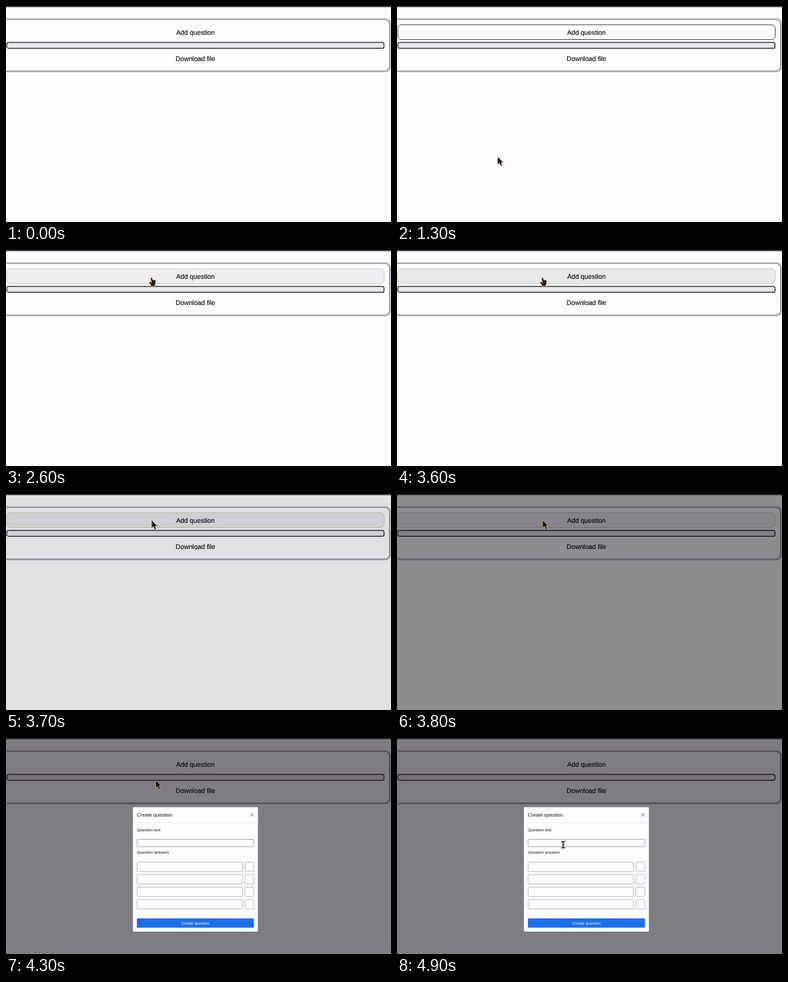
An HTML page for the animation above (5000 ms loop, 600 px wide and 338 px high).

```html
<!DOCTYPE html>
<html lang="en">
<head>
<meta charset="utf-8">
<title>Create question dialog</title>
<style>
  html, body { margin: 0; width: 100%; height: 100%; overflow: hidden; background: #fdfcff; }
  svg { display: block; width: 100vw; height: 100vh; }
  text { font-family: "Liberation Sans", Arial, sans-serif; fill: #151416; text-rendering: geometricPrecision; }
  .page { font-size: 10.3px; text-anchor: middle; stroke: #151416; stroke-width: .18; }
  .label { font-size: 6.24px; }
  .field { fill: none; stroke: #aaa8ad; stroke-width: .8; }
</style>
</head>
<body>
<svg viewBox="0 0 600 338">
  <defs>
    <filter id="soft" x="-5%" y="-20%" width="110%" height="140%"><feGaussianBlur stdDeviation="1.1"/></filter>
  </defs>

  <rect width="600" height="338" fill="#fdfcff"/>
  <rect width="600" height="1.7" fill="#34313c"/>
  <rect x="-12" y="21" width="610" height="81" rx="7" fill="none" stroke="#605e63" stroke-width="2.2" opacity=".7" filter="url(#soft)"/>
  <rect x="-12" y="21" width="609.7" height="80.7" rx="7" fill="#fdfcff" stroke="#7d7b80" stroke-width="1.1"/>
  <rect id="hover" x="1" y="29.3" width="588.5" height="23.2" rx="6"/>
  <rect id="outline" x="1" y="29.3" width="588.5" height="23.2" rx="6" fill="none"/>
  <rect x="1.3" y="57" width="587.8" height="9.2" rx="2.8" fill="#ebe8ee" stroke="#38363b" stroke-width="1.4"/>
  <text class="page" x="295.2" y="44.5">Add question</text>
  <text class="page" x="295.2" y="85.7">Download file</text>

  <rect id="backdrop" width="600" height="338" fill="#040006"/>

  <g id="modal">
    <rect x="197.8" y="108.2" width="194.8" height="194.8" rx="1.5" fill="#fdfcff"/>
    <text x="204" y="122.8" font-size="7.8">Create question</text>
    <path d="M380.3 117.2l5.8 5.8m0-5.8l-5.8 5.8" stroke="#6b696e" stroke-width=".9"/>
    <path d="M198 132.5H392.5" stroke="#e6e4e9" stroke-width=".7"/>
    <text class="label" x="204" y="145.7">Question text</text>
    <rect class="field" x="204.3" y="158.6" width="181.8" height="11.4" rx=".8" style="stroke:#8e8c91"/>
    <text class="label" x="204" y="181">Question answers</text>
    <g id="answers"></g>
    <rect x="204" y="282.2" width="182.4" height="14.5" rx="1.3" fill="#196ff2"/>
    <text class="label" x="295.2" y="291.8" text-anchor="middle" style="fill:#fff">Create question</text>
  </g>

  <g id="cursor">
    <path id="arrow" d="M0 0V12L2.8 9.7 4.8 14.4 7 13.4 5 9H8.6Z" fill="#17110e" stroke="#d9b987" stroke-width=".6"/>
    <path id="hand" d="M-1.5 3.4C-1.6 2.1 .2 1.9 .7 3L1.8 6 3.6 5.7 5.2 6.2 6.4 7 5.9 11.6 4.6 15.6H-.6L-3.7 10.4C-4.4 9 -3 8.2 -2 9.1L-.5 10.2Z" fill="#2a1a13" stroke="#efd8c2" stroke-width=".6"/>
    <path id="beam" d="M-3-5H-1.2L0-4 1.2-5H3M0-4V4M-3 5H-1.2L0 4 1.2 5H3M-1.3 1H1.3" fill="none" stroke="#241d18" stroke-width="1.4"/>
  </g>
</svg>
<script>
const $ = id => document.getElementById(id);
const LOOP = 5000, STEP = 100;

$("answers").innerHTML = [0, 1, 2, 3].map(row => {
  const y = 194.2 + row * 19.55;
  return `<rect class="field" x="204.3" y="${y}" width="164" height="14.8" rx="1.3"/>
          <rect class="field" x="372.3" y="${y}" width="13.8" height="14.8" rx="1.3"/>`;
}).join("");

const ramp = (t, from, to) => Math.min(1, Math.max(0, (t - from) / (to - from)));
const smooth = p => p * p * (3 - 2 * p);
const within = (t, from, to) => t >= from && t < to;

// The pointer sweeps down the page, climbs to the button, then enters the dialog.
const stops = [
  { at: 800, x: 190, y: 42 },
  { at: 1150, x: 153, y: 288 },
  { at: 1300, x: 157, y: 236 },
  { at: 2500, x: 227, y: 41 },
  { at: 4100, x: 227, y: 41 },
  { at: 4800, x: 259, y: 167 }
];

function pointer(t) {
  let { x, y } = stops[0];
  for (let i = 1; i < stops.length; i++) {
    const a = stops[i - 1], b = stops[i];
    const p = smooth(ramp(t, a.at, b.at));
    x += (b.x - a.x) * p;
    y += (b.y - a.y) * p;
  }
  return [x, y];
}

function hoverAmount(t) {
  const first = ramp(t, 700, 800) - ramp(t, 900, 1100);
  const second = ramp(t, 2400, 2700) - ramp(t, 3700, 3950);
  return first + second;
}

function outlineColor(t) {
  if (within(t, 1000, 1400)) return "#454348";
  return within(t, 800, 1000) || within(t, 2400, 4100) ? "#bad6af" : "none";
}

function cursorShape(t) {
  if (t < 800) return "";
  if (t >= 4700) return "beam";
  return t < 900 || within(t, 2400, 3700) ? "hand" : "arrow";
}

function draw(now) {
  const t = Math.floor(now % LOOP / STEP) * STEP;
  $("hover").setAttribute("opacity", .08 * hoverAmount(t));
  $("outline").setAttribute("stroke", outlineColor(t));
  $("backdrop").setAttribute("opacity", .5 * smooth(ramp(t, 3640, 3840)));

  $("modal").setAttribute("opacity", ramp(t, 3900, 4030));
  $("modal").setAttribute("transform", `translate(0 ${-18 * (1 - ramp(t, 3900, 4100))})`);

  $("cursor").setAttribute("transform", `translate(${pointer(t)})`);
  for (const id of ["arrow", "hand", "beam"])
    $(id).style.display = id === cursorShape(t) ? "" : "none";
}

const start = performance.now();
function frame() {
  draw(performance.now() - start);
  requestAnimationFrame(frame);
}
frame();
</script>
</body>
</html>
```
